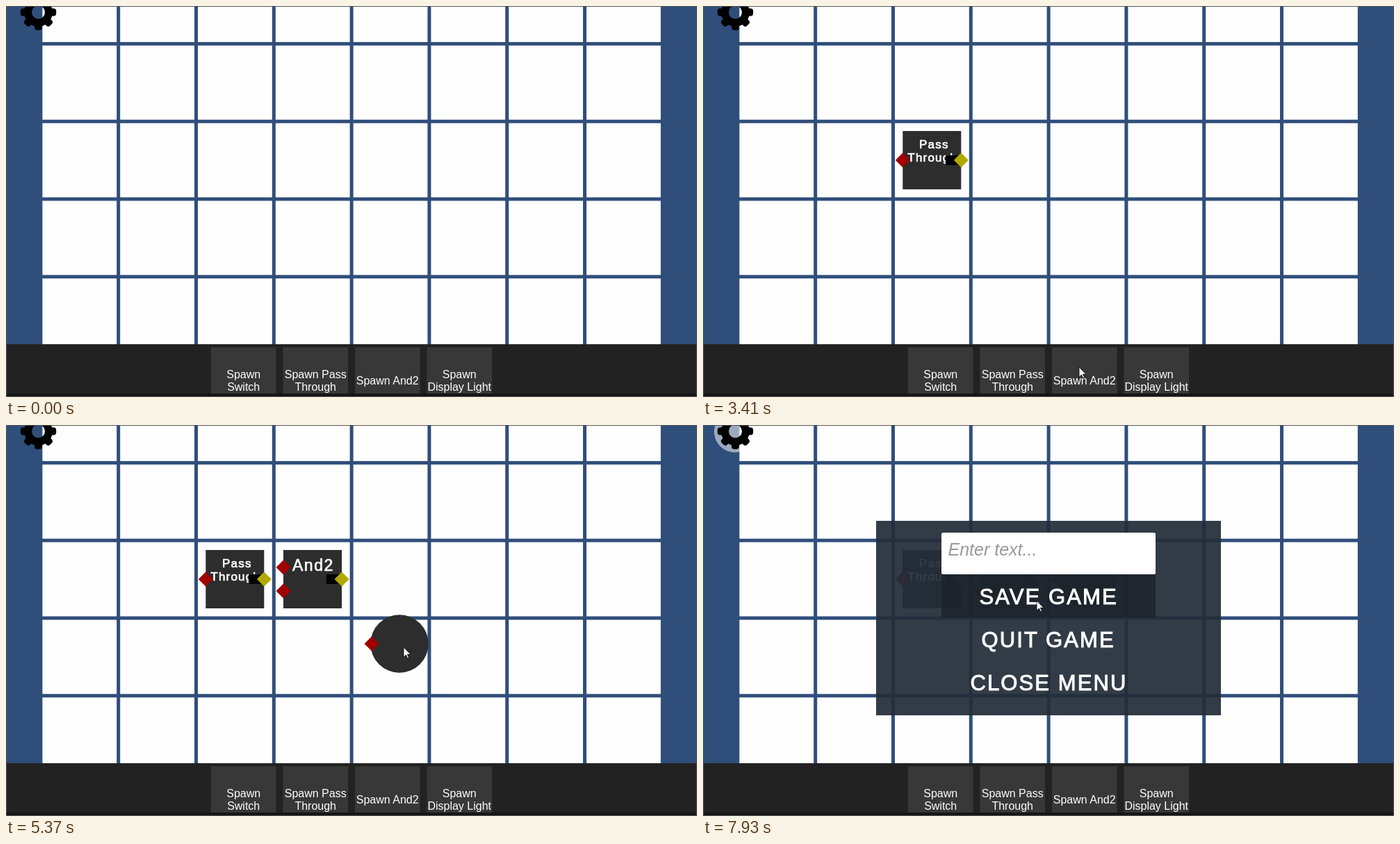
These frames come from a looping animation (994x563 px, 8000 ms). An HTML page:

```html
<!DOCTYPE html>
<html lang="en">
<head>
<meta charset="utf-8">
<title>Logic gate builder</title>
<style>
  html, body { margin: 0; width: 100%; height: 100%; overflow: hidden; background: #222; }
  svg { display: block; width: 994px; height: 563px; }
  text { font-family: "Liberation Sans", Arial, sans-serif; fill: #fff; }
  .spawn { font-size: 16px; text-anchor: middle; }
  .heavy { stroke: #fff; stroke-width: .7px; }
  .pass { font-size: 17px; letter-spacing: 1.2px; }
  .and { font-size: 23px; letter-spacing: 1.5px; }
  .menu { font-size: 31px; letter-spacing: 2.1px; stroke-width: 1px; }
  .hint { font-size: 25px; font-style: italic; fill: #999; }
</style>
</head>
<body>
<svg viewBox="0 0 994 563">
  <defs>
    <path id="pin" d="M0-10.5 10.5 0 0 10.5-10.5 0Z"/>
    <g id="output">
      <rect x="20" y="-7" width="22" height="14" fill="#000"/>
      <use href="#pin" x="42" fill="#b1a900"/>
    </g>
  </defs>
  <rect width="994" height="563" fill="#304e7a"/>
  <g id="cells" fill="#fefefe"></g>

  <g id="pass">
    <rect x="-42" y="-42" width="84" height="84" fill="#2d2d2d"/>
    <text class="heavy pass" x="-18.3" y="-17.3">Pass</text>
    <text class="heavy pass" x="-35" y="2">Through</text>
    <use href="#output"/>
    <use href="#pin" x="-42" fill="#a20000"/>
  </g>
  <g id="and">
    <rect x="-42" y="-42" width="84" height="84" fill="#2d2d2d"/>
    <text class="heavy and" x="-29" y="-12">And2</text>
    <use href="#output"/>
    <use href="#pin" x="-42" y="-17" fill="#a20000"/>
    <use href="#pin" x="-42" y="17" fill="#a20000"/>
  </g>
  <g id="light">
    <circle r="41.7" fill="#2d2d2d"/>
    <use href="#pin" x="-40" fill="#a20000"/>
  </g>

  <rect y="487" width="994" height="76" fill="#222"/>
  <rect y="558" width="994" height="5" fill="#161616"/>
  <g id="buttons"></g>

  <circle id="gearHover" cx="46" cy="9.5" r="30" fill="#fff" fill-opacity=".52"/>
  <g id="gear" transform="translate(46.5 9)">
    <circle r="15" fill="none" stroke="#000" stroke-width="11"/>
  </g>

  <g id="menu">
    <rect x="249" y="138" width="496" height="280" fill="#232e3a" fill-opacity=".93"/>
    <rect id="saveHover" x="343" y="215" width="308" height="62" fill="#1c2229" fill-opacity=".78"/>
    <rect x="343" y="155" width="308" height="60" rx="2.5" fill="#fff"/>
    <text class="hint" x="352.5" y="187.5">Enter text...</text>
    <text class="heavy menu" x="397.5" y="258">SAVE GAME</text>
    <text class="heavy menu" x="400.5" y="320">QUIT GAME</text>
    <text class="heavy menu" x="384.5" y="382">CLOSE MENU</text>
  </g>

  <rect x=".5" y=".5" width="993" height="562" fill="none" stroke="#555"/>
  <path id="cursor" d="M0 0V14.3L3.4 11.1 5.6 16 7.6 15.1 5.4 10.3H10Z" fill="#fff" stroke="#000" stroke-width=".8"/>
</svg>
<script>
const LOOP = 8000, STEP = 120;
const $ = id => document.getElementById(id);

function add(parent, tag, attrs, label) {
  const el = document.createElementNS('http://www.w3.org/2000/svg', tag);
  for (const k in attrs) el.setAttribute(k, attrs[k]);
  if (label) el.textContent = label;
  parent.append(el);
}

for (let row = 0; row < 5; row++)
  for (let col = 0; col < 8; col++)
    add($('cells'), 'rect', { x: 52.4 + col * 111.8, y: -54.9 + row * 111.8, width: 106.8, height: 106.8 });

[['Spawn', 'Switch'], ['Spawn Pass', 'Through'], ['Spawn And2'], ['Spawn', 'Display Light']].forEach((lines, i) => {
  const x = 295 + i * 103.5;
  add($('buttons'), 'rect', { x, y: 491.5, width: 93.5, height: 66.5, fill: '#383838' });
  lines.forEach((line, n) =>
    add($('buttons'), 'text', { class: 'spawn', x: x + 46.7, y: (lines.length > 1 ? 536 : 544.8) + n * 17.6 }, line));
});

for (let a = 0; a < 360; a += 45)
  add($('gear'), 'rect', { x: -5.5, y: 16, width: 11, height: 9.7, rx: 4, transform: `rotate(${a})` });

// Pointer runs: start time, then one x,y pair per step.
const runs = [
  [1320, 418, 556, 424, 549, 434, 540, 441, 534],
  [1960, 421, 484, 398, 385, 375, 284, 353, 238, 347, 222],
  [2690, 349, 225, 364, 240, 405, 300, 462, 390, 510, 465, 535, 508, 541, 520],
  [3530, 543, 500, 480, 360, 421, 275, 426, 263],
  [4030, 438, 257, 444, 253],
  [4390, 458, 259, 486, 300, 540, 380, 598, 460, 630, 508, 638, 520],
  [5130, 611, 470, 596, 400, 572, 320, 554, 258, 547, 232, 546, 227, 546, 228],
  [5970, 553, 244, 562, 261],
  [6340, 545, 248, 470, 205, 350, 140, 220, 85, 110, 45, 58, 28, 36, 23],
  [7330, 46, 30, 110, 66, 220, 125, 350, 185, 440, 232, 480, 253]
];

// Each part follows the pointer from grab to drop, then snaps into its cell.
const parts = [
  { id: 'pass', grab: 1960, drop: 2690, dx: 5, dy: 14, cell: [329.3, 222] },
  { id: 'and', grab: 3530, drop: 4390, dx: -14, dy: -20, cell: [441, 222] },
  { id: 'light', grab: 5130, drop: 5850, dx: -6, dy: -5, cell: [553, 222] }
];

function pointer(t) {
  const run = runs.filter(r => r[0] <= t).pop();
  if (!run) return null;
  const i = Math.min(Math.floor((t - run[0]) / STEP), (run.length - 3) / 2);
  return [run[1 + i * 2], run[2 + i * 2]];
}

const show = (id, on) => { $(id).style.display = on ? '' : 'none'; };
const place = (id, x, y) => $(id).setAttribute('transform', `translate(${x} ${y})`);

function draw(t) {
  const p = pointer(t);
  show('cursor', p);
  if (p) place('cursor', ...p);
  for (const { id, grab, drop, dx, dy, cell } of parts) {
    show(id, t >= grab);
    if (t >= drop) place(id, ...cell);
    else if (t >= grab) place(id, p[0] + dx, p[1] + dy);
  }
  show('gearHover', t >= 6940);
  show('menu', t >= 7180);
  show('saveHover', t >= 7810);
}

const start = performance.now();
function tick() {
  draw((performance.now() - start) % LOOP);
  requestAnimationFrame(tick);
}
tick();
</script>
</body>
</html>
```
